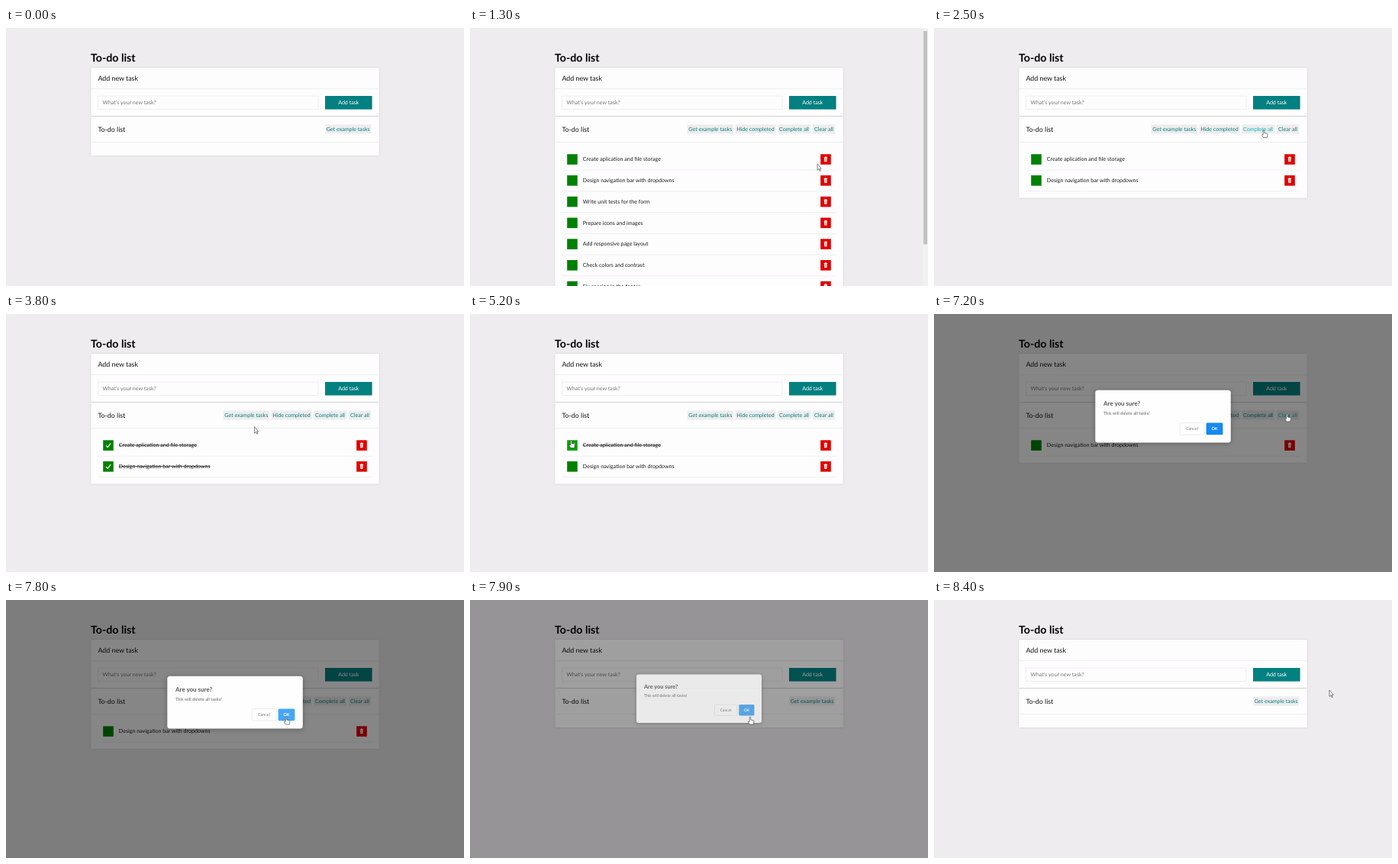
These frames come from a looping animation (600x338 px, 8.5 s). An HTML page:

```html
<!DOCTYPE html>
<html lang="en">
<head>
<meta charset="utf-8">
<title>To-do list</title>
<style>
  html, body { margin: 0; width: 100%; height: 100%; overflow: hidden; background: #eeecee; }
  svg { display: block; font-family: Lato, sans-serif; text-rendering: geometricPrecision; }
  .panel { fill: #fefdfe; filter: drop-shadow(0 0 1.2px #ccc); }
  .dialog { filter: drop-shadow(0 1px 3px rgba(0, 0, 0, .3)); }
</style>
</head>
<body>
<svg id="stage" width="600" height="338" viewBox="0 0 600 338"></svg>
<script>
const LOOP = 8500, PITCH = 27.75;
const stage = document.getElementById('stage');

const names = [
  'Create aplication and file storage',
  'Design navigation bar with dropdowns',
  'Write unit tests for the form',
  'Prepare icons and images',
  'Add responsive page layout',
  'Check colors and contrast',
  'Fix spacing in the footer',
  'Publish the first version'
];

// Pointer path: time, x, y of the tip
const path = [
  [100, 264, 303], [800, 445, 131], [1100, 445, 131], [1500, 465, 224],
  [2200, 465, 224], [2500, 432, 133.5], [3000, 432, 133.5], [3600, 366, 137],
  [3700, 362, 139], [4100, 133, 194], [4500, 133, 194], [4800, 132.5, 165.5],
  [5300, 132.5, 165.5], [5700, 372, 131], [6100, 372, 131], [6500, 483, 134],
  [6800, 462.5, 131], [7300, 462.5, 131], [7700, 367, 153], [8000, 367, 153],
  [8400, 518, 118]
];

const clamp = v => Math.max(0, Math.min(1, v));
const ease = v => v * v * (3 - 2 * v);

function pointerAt(t) {
  const i = path.findIndex(k => k[0] > t);
  if (i < 0) return path.at(-1).slice(1);
  const a = path[Math.max(0, i - 1)], b = path[i];
  const p = ease(clamp((t - a[0]) / (b[0] - a[0] || 1)));
  return [a[1] + (b[1] - a[1]) * p, a[2] + (b[2] - a[2]) * p];
}

const rect = (x, y, w, h, fill, more = '') =>
  `<rect x="${x}" y="${y}" width="${w}" height="${h}" fill="${fill}" ${more}/>`;
const text = (x, y, size, fill, s, more = '') =>
  `<text x="${x}" y="${y}" font-size="${size}" fill="${fill}" ${more}>${s}</text>`;
const rule = (x, y, w) => rect(x, y, w, .6, '#e6e4e6');
const MID = 'text-anchor="middle"';

function visibleTasks(t) {
  if (t < 1000 || t >= 7850) return [];
  // One example is deleted every 100 ms until two are left
  const count = t < 1700 ? 8 : Math.max(2, 7 - Math.floor((t - 1700) / 100));
  const all = names.slice(0, 2).concat(names.slice(names.length - count + 2));
  return all
    .map((name, i) => ({ name, done: t >= 2800 && (i === 0 || t < 4200) }))
    .filter(task => t < 5800 || !task.done);
}

function draw(t) {
  const [px, py] = pointerAt(t);
  const modal = t >= 7150 && t < 8000;
  const blocked = t > 7300 && t < 8000;
  const tasks = visibleTasks(t), n = tasks.length;
  let hand = false;

  const over = (x, y, w, h) => {
    const hit = t >= 100 && px >= x && px <= x + w && py >= y && py <= y + h;
    hand = hand || hit;
    return hit;
  };
  const hover = (...box) => !blocked && over(...box);

  const link = (cx, w, label) => {
    const x = cx - w / 2;
    const color = hover(x, 126.5, w, 12.5) ? '#00b8b8' : '#008080';
    return rect(x, 126.5, w, 12, '#eeecee') + text(cx, 135.2, 7.11, color, label, MID);
  };

  const row = (task, i) => {
    const y = 165.3 + i * PITCH;
    const green = hover(127, y - .5, 14, 14) ? '#00a000' : '#008000';
    const red = hover(459, y, 14, 14) ? '#ff3030' : '#e00000';
    return rect(127.2, y, 13.6, 13.6, green) +
      (task.done ? `<path d="M131 ${y + 7}l2.2 2.4 4-5.4" fill="none" stroke="#fff" stroke-width="1.1"/>` : '') +
      text(147.8, y + 9, 7.11, '#1a1a1a', task.name, task.done ? 'text-decoration="line-through"' : '') +
      rect(459.2, y, 13.6, 13.6, red) +
      `<path d="M463.6 ${y + 4}h4.6v.9h-4.6zM464.9 ${y + 3.3}h2v.7h-2zM464 ${y + 5.2}h3.8l-.3 4.8h-3.2z" fill="#fff"/>` +
      `<path d="M465.2 ${y + 6}v3.2m1.4-3.2v3.2" stroke="${red}" stroke-width=".4"/>` +
      rule(120, y + 20.5, 360);
  };

  const dialog = () => {
    const p = clamp((t - 7840) / 160), fade = clamp(1 - 1.4 * p * p), scale = 1 - .2 * p;
    const blue = over(356.5, 143, 22, 15.5) ? '#46a6f4' : '#1689ee';
    return rect(0, 0, 600, 338, '#000', `opacity="${.47 * fade}"`) +
      `<g opacity="${fade}" transform="translate(300 ${134.2 - 13 * p}) scale(${scale}) translate(-300 -134.2)">` +
      rect(211.3, 99.8, 177.5, 68.8, '#fefefe', 'rx="3.5" class="dialog"') +
      text(222, 119.8, 8, '#555', 'Are you sure?', 'font-weight="bold"') +
      text(222, 131.6, 5.7, '#888', 'This will delete all tasks!', 'font-weight="bold"') +
      rect(322, 142.6, 32, 15.6, '#fefefe', 'rx="1.5" stroke="#ddd" stroke-width=".6"') +
      text(338, 152.4, 5.4, '#777', 'Cancel', MID) +
      rect(356.6, 142.6, 21.8, 15.6, blue, 'rx="1.5"') +
      text(367.5, 152.4, 5.4, '#fff', 'OK', MID + ' font-weight="bold"') + '</g>';
  };

  const add = hover(418, 89, 61.6, 17.6) ? '#00a0a0' : '#008080';
  const links = n
    ? (t < 5800 ? link(314.8, 60, 'Get example tasks') + link(374, 53, 'Hide completed')
                : link(312.4, 60, 'Get example tasks') + link(373, 55, 'Show completed')) +
      link(424.6, 42.6, 'Complete all') + link(463.5, 29, 'Clear all')
    : link(448.2, 60, 'Get example tasks');

  let out =
    text(111, 44, 14.2, '#000', 'To-do list', 'font-weight="bold"') +
    rect(111.3, 52, 377.5, 63, '#fefdfe', 'class="panel"') +
    text(120.4, 69, 8.85, '#111', 'Add new task') +
    rule(111.3, 79.5, 377.5) +
    rect(120.4, 89, 288.6, 17.6, '#fefdfe', 'stroke="#e4e2e4" stroke-width=".6"') +
    text(126.6, 100.4, 7.11, '#777', "What's your new task?") +
    rect(418, 89, 61.6, 17.6, add) +
    text(448.8, 100.4, 7.11, '#fff', 'Add task', MID) +
    rect(111.3, 116.3, 377.5, 50.8 + n * PITCH, '#fefdfe', 'class="panel"') +
    text(120.4, 136, 8.85, '#111', 'To-do list') +
    rule(111.3, 149.5, 377.5) + links + tasks.map(row).join('');

  if (n > 5) out += rect(593, 0, 7, 338, '#f1f1f1') + rect(594, 4, 5, 338 * 338 / (187 + n * PITCH), '#c1c1c1');
  if (modal) out += dialog();
  if (t >= 100) {
    const shape = hand
      ? 'M-.8.5Q0-.6.8.5V4L4.3 4.8Q5.2 5.2 5 6.2L4.2 10H-.4L-2.6 6.8Q-2.4 5.4-.8 6.4Z'
      : 'M0 0V8.4L1.9 6.7 3.1 9.6 4.3 9.1 3.1 6.3H5.2Z';
    out += `<path d="${shape}" transform="translate(${px} ${py})" fill="#fff" stroke="#333" stroke-width=".6" stroke-linejoin="round"/>`;
  }
  stage.innerHTML = out;
}

const start = performance.now();
function tick() {
  draw((performance.now() - start) % LOOP);
  requestAnimationFrame(tick);
}
tick();
</script>
</body>
</html>
```
